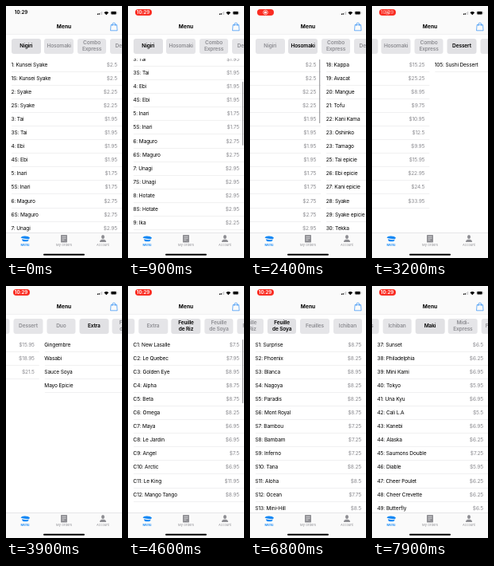
Animation, 146 px wide and 316 px high, one loop 8 s. Source, as an HTML page:

```html
<!DOCTYPE html>
<html lang="en">
<head>
<meta charset="utf-8">
<title>Menu</title>
<style>
html, body { margin: 0; width: 100%; height: 100%; overflow: hidden; background: #fff; }
#stage { position: relative; width: 146px; height: 316px; overflow: hidden; background: #fff;
  font: 400 6.6px/17.1px Inter, "Liberation Sans", sans-serif; letter-spacing: -.16px; color: #000; }
#stage div { position: absolute; box-sizing: border-box; white-space: pre; }
#stage svg { position: absolute; left: 0; top: 0; }
#list { left: 0; top: 65.5px; width: 146px; height: 218.5px; overflow: hidden; }
#pager, .page, .rows { left: 0; top: 0; width: 146px; height: 100%; }
.row { left: 6.5px; width: 139.5px; height: 17.1px; border-bottom: 1px solid #f0f0f1; }
.row b { position: absolute; right: 6px; font-weight: 400; color: #8a8a8f; }
.bar { right: 1px; top: 1.5px; width: 1.4px; border-radius: 1px; background: #8f8f92; opacity: 0; }
#header { left: 0; top: 0; width: 146px; height: 36px; background: #fafafa; border-bottom: 1px solid #f0f0f1; }
#title { left: 0; top: 18px; width: 146px; text-align: center; font-weight: 700; letter-spacing: 0; }
#tabs { left: 0; top: 41px; height: 18.5px; }
.tab { top: 0; width: 36.6px; height: 18.5px; border-radius: 3px; background: #e5e5e8; color: #8e8e93;
  font-weight: 600; line-height: 8px; display: flex; align-items: center; justify-content: center; text-align: center; }
.tab.on { background: #e1e1e4; color: #000; }
#footer { left: 0; top: 284px; width: 146px; height: 32px; background: #fafafa; border-top: 1px solid #e6e6e8; }
.label { top: 296px; width: 40px; text-align: center; color: #8e8e93; font-size: 4px; line-height: 8px; letter-spacing: 0; }
.label.on { color: #1588f5; font-weight: 600; }
#pill { left: 9px; top: 3.6px; width: 21px; height: 8.8px; border-radius: 4px; background: #fa2c22; }
.clock { left: 8.7px; top: 3.3px; width: 20.6px; text-align: center; font-size: 6.2px; line-height: 9.8px; font-weight: 600; letter-spacing: -.05px; }
#white { color: #fff; }
</style>
</head>
<body>
<div id="stage">
  <div id="list"><div id="pager"></div></div>
  <div id="tabs"></div>
  <div id="header"></div>
  <div id="title">Menu</div>
  <div id="footer"></div>
  <div class="label on" style="left:4px">Menu</div>
  <div class="label" style="left:53px">My Orders</div>
  <div class="label" style="left:102px">Account</div>
  <div class="clock" id="black">10:29</div>
  <div id="pill"></div>
  <div class="clock" id="white">10:29</div>
  <svg width="146" height="316" viewBox="0 0 146 316" fill="none">
    <g id="record">
      <circle cx="19.5" cy="8" r="2.8" stroke="#fff" stroke-width=".7"/>
      <circle cx="19.5" cy="8" r="1.6" fill="#fff"/>
    </g>
    <g fill="#000">
      <path d="M115 9.6h1v1.4h-1zM116.7 9h1v2h-1z"/>
      <path d="M118.4 8h1v3h-1zM120.1 7h1v4h-1z" fill="#c4c4c6"/>
      <path d="M123.4 8.2Q126.3 5.6 129.2 8.2L126.3 11.3z"/>
      <rect x="132.3" y="7" width="6.4" height="3.4" rx=".8"/>
      <path d="M140 8.1q.8.6 0 1.4z" fill="#888"/>
    </g>
    <rect x="131.9" y="6.6" width="7.4" height="4.2" rx="1.2" stroke="#888" stroke-width=".3"/>
    <g stroke="#2f8ff5" stroke-width=".7" stroke-linejoin="round">
      <path d="M132.1 23.6h7.4l.6 7.2h-8.6z"/>
      <path d="M133.8 25v-1.6a2 2.3 0 0 1 4 0V25"/>
    </g>
    <g fill="#1588f5">
      <path d="M18.6 290.8q1-2.5 5.4-2.3t6 2.1l-1 1.6q-5 .4-10.4-1.4z"/>
      <path d="M20 292.2q4.4 1.5 8.6.9l-.7 1.6q-3.6 1-7 0z"/>
    </g>
    <rect x="69" y="287" width="8" height="9.4" rx=".6" fill="#8e8e93"/>
    <path d="M70.5 289.2h5M70.5 291.3h5M70.5 293.4h3" stroke="#fafafa" stroke-width=".6"/>
    <g fill="#8e8e93">
      <ellipse cx="122" cy="289.4" rx="2" ry="2.5"/>
      <path d="M118 296q0-2.7 2.8-3.2h2.4q2.8.5 2.8 3.2z"/>
    </g>
    <rect x="47" y="310.8" width="52" height="2" rx="1" fill="#000"/>
  </svg>
</div>
<script>
const LOOP = 8000, WIDTH = 146, ROW = 17.1, PITCH = 41.4;
const $ = id => document.getElementById(id);

const tabNames = ['Nigiri', 'Hosomaki', 'Combo\nExpress', 'Dessert', 'Duo', 'Extra', 'Feuille\nde Riz',
  'Feuille\nde Soya', 'Feuilles', 'Ichiban', 'Maki', 'Midi-\nExpress', 'Plateaux'];

const nigiri = 'Kunsei Syake 2.5,Syake 2.25,Tai 1.95,Ebi 1.95,Inari 1.75,Maguro 2.75,Unagi 2.95,Hotate 2.95,Ika 2.25,Tako 2.25,Tobiko 2.75,Masago 2.5'
  .split(',').flatMap((item, i) => [`${i + 1}: ${item}`, `${i + 1}S: ${item}`]).join();

const pages = [
  nigiri,
  '18: Kappa 3.5,19: Avacat 3.75,20: Mangue 3.75,21: Tofu 3.5,22: Kani Kama 3.95,23: Oshinko 3.5,23: Tamago 3.75,25: Tai epicie 4.25,26: Ebi epicie 4.5,27: Kani epicie 4.25,28: Syake 4.5,29: Syake epicie 4.75,30: Tekka 4.95',
  '94: Combo A 15.25,95: Combo B 25.25,96: Combo C 8.95,97: Combo D 9.75,98: Combo E 10.95,99: Combo F 12.5,100: Combo G 9.95,101: Combo H 15.95,102: Combo I 22.95,103: Combo J 24.5,104: Combo K 33.95',
  '105: Sushi Dessert 5.95',
  'D1: Duo Maki 15.95,D2: Duo Sushi 18.95,D3: Duo Sashimi 21.5',
  'Gingembre 0.75,Wasabi 0.75,Sauce Soya 0.5,Mayo Epicie 0.95',
  'C1: New Lasalle 7.5,C2: Le Quebec 7.95,C3: Golden Eye 8.95,C4: Alpha 8.75,C5: Beta 8.75,C6: Omega 8.25,C7: Maya 6.95,C8: Le Jardin 6.95,C9: Angel 7.5,C10: Arctic 6.95,C11: Le King 11.95,C12: Mango Tango 8.95',
  'S1: Surprise 8.75,S2: Phoenix 8.25,S3: Blanca 8.95,S4: Nagoya 8.25,S5: Paradis 8.25,S6: Mont Royal 8.75,S7: Bambou 7.25,S8: Bambam 7.25,S9: Inferno 7.25,S10: Tana 8.25,S11: Aloha 8.5,S12: Ocean 7.75,S13: Mini-Hill 8.5',
  '37: Sunset 6.5,38: Philadelphia 6.25,39: Mini Kami 6.95,40: Tokyo 5.95,41: Una Kyu 6.95,42: Cali L.A 5.5,43: Kanebi 6.95,44: Alaska 6.25,45: Saumons Double 7.25,46: Diable 5.95,47: Cheer Poulet 6.25,48: Cheer Crevette 6.25,49: Butterfly 6.5'
];

const rowHtml = (item, i) => {
  const cut = item.lastIndexOf(' ');
  return `<div class="row" style="top:${i * ROW}px">${item.slice(0, cut)}<b>$${item.slice(cut + 1)}</b></div>`;
};
$('pager').innerHTML = pages.map((items, i) =>
  `<div class="page" style="left:${i * WIDTH}px"><div class="rows">${items.split(',').map(rowHtml).join('')}</div><div class="bar"></div></div>`).join('');
$('tabs').innerHTML = tabNames.map((name, i) =>
  `<div class="tab" style="left:${(7 + i * PITCH).toFixed(1)}px">${name}</div>`).join('');

const tabs = [...document.querySelectorAll('.tab')];
const bars = document.querySelectorAll('.bar');
const rows = document.querySelector('.rows');
const centred = i => Math.max(0, i * PITCH - 47.7);

// Each track is a list of [time, value].
const pagePos = [[2150, 0], [2740, 1], [2760, 1], [3000, 2], [3040, 2], [3360, 3], [3400, 3], [3680, 4],
  [3720, 4], [4000, 5], [4040, 5], [4350, 6], [4720, 6], [5200, 7], [7220, 7], [7600, 8]];
const selection = [[0, 0], [2320, 1], [2860, 2], [3170, 3], [3530, 4], [3850, 5], [4180, 6], [4920, 7], [7250, 10]];
const listScroll = [[650, 0], [1080, 120], [1500, -19], [2050, 0]];
const tabDrag = [[5350, centred(7)], [5860, -17], [5920, -17], [6220, 0], [6250, 0], [6920, 300]];
const pillIn = [[50, 0], [500, 1]];
const recordOn = [[800, 0], [1400, 1], [2900, 1], [3500, 0]];
const firstBar = [[650, 0], [750, 1], [2550, 1], [2800, 0]];
const rizBar = [[4300, 0], [4400, 1], [4850, 1], [5100, 0]];

function tween(track, t) {
  const next = track.findIndex(key => key[0] > t);
  if (next === 0) return track[0][1];
  if (next < 0) return track.at(-1)[1];
  const [t0, a] = track[next - 1], [t1, b] = track[next];
  const k = (t - t0) / (t1 - t0);
  return a + (b - a) * k * k * (3 - 2 * k);
}

function tabOffset(t, step) {
  const [start, index] = selection[step];
  if (t >= 5350 && start < 5350) return tween(tabDrag, t);
  if (step === 0) return 0;
  const from = start > 5350 ? tabDrag.at(-1)[1] : centred(selection[step - 1][1]);
  return tween([[start, from], [start + 280, centred(index)]], t);
}

function draw(now) {
  const t = now % LOOP;
  const step = selection.findLastIndex(key => key[0] <= t);
  const scroll = tween(listScroll, t);
  const pill = tween(pillIn, t), record = tween(recordOn, t);

  $('pager').style.transform = `translateX(${-tween(pagePos, t) * WIDTH}px)`;
  rows.style.transform = `translateY(${-scroll}px)`;
  bars[0].style.cssText = `opacity:${tween(firstBar, t)};height:${80 + Math.min(0, scroll)}px;transform:translateY(${Math.max(0, scroll) * .37}px)`;
  bars[6].style.cssText = `opacity:${tween(rizBar, t)};height:80px`;

  $('tabs').style.transform = `translateX(${-tabOffset(t, step)}px)`;
  tabs.forEach((tab, i) => tab.classList.toggle('on', i === selection[step][1]));

  $('black').style.opacity = 1 - pill;
  $('pill').style.opacity = pill;
  $('white').style.opacity = pill * (1 - record);
  $('record').style.opacity = record;
}

const begin = performance.now();
function frame() {
  draw(performance.now() - begin);
  requestAnimationFrame(frame);
}
frame();
</script>
</body>
</html>
```
